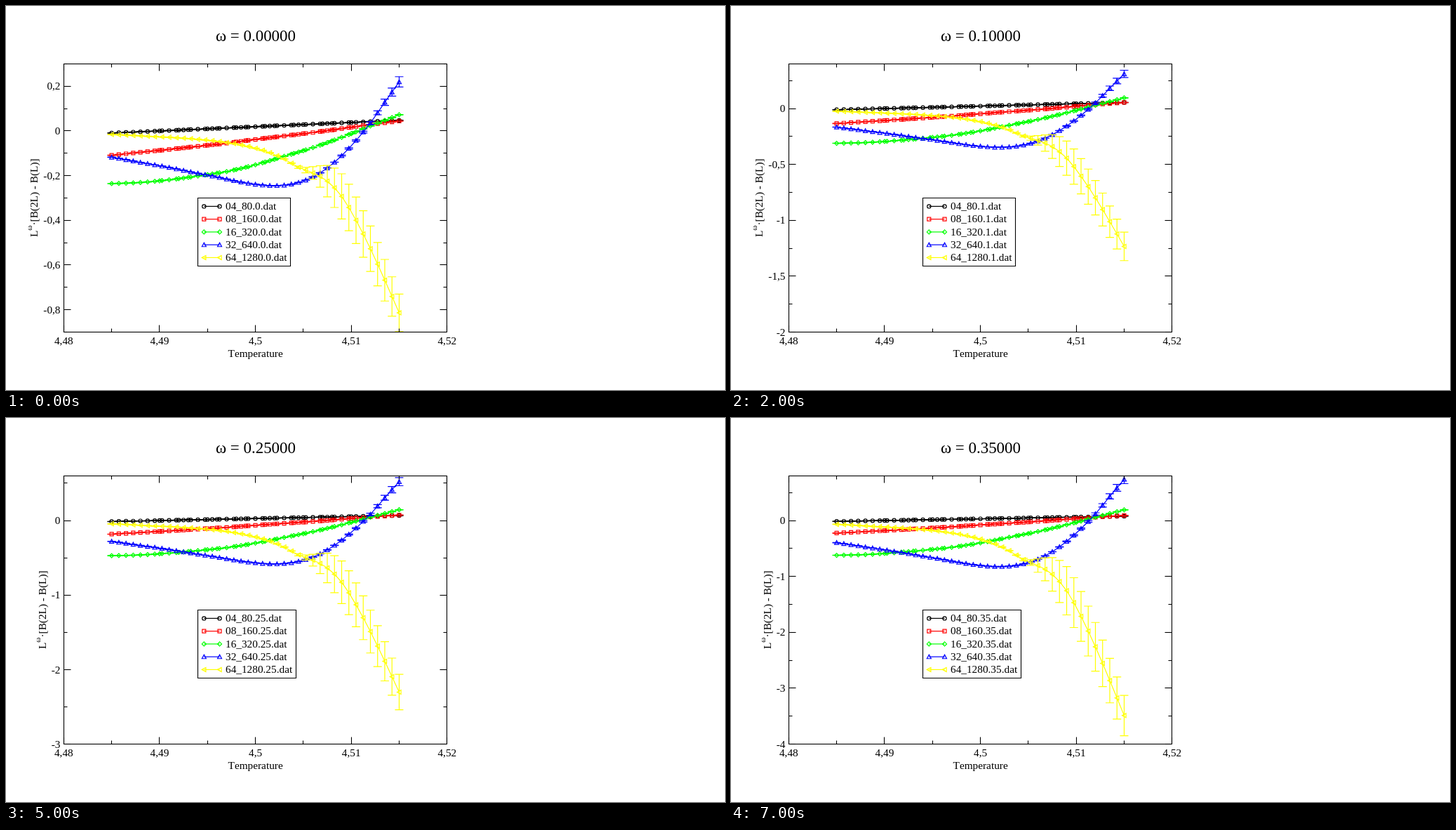
These frames come from a looping animation (1025 px wide and 547 px high, 8 s). An HTML page with a canvas:

```html
<!DOCTYPE html>
<html>
<head>
<meta charset="utf-8">
<style>
html, body { margin: 0; width: 100%; height: 100%; overflow: hidden; background: #fff; }
canvas { display: block; }
</style>
</head>
<body>
<canvas id="stage" width="1025" height="547"></canvas>
<script>
const ctx = document.getElementById('stage').getContext('2d');
const FACE = '"Liberation Serif", "Times New Roman", serif';
const SIZE = 15.3;
const BOX = { l: 82.3, r: 628.8, t: 82.3, b: 464.5 };
const STEP = 1000;

// Axis bottom, axis top and major tick spacing for each exponent
const VIEWS = [
  [-0.9, 0.3, 0.2], [-2, 0.3, 0.5], [-2, 0.4, 0.5], [-2, 0.4, 0.5],
  [-2, 0.5, 0.5], [-3, 0.6, 1], [-3, 0.7, 1], [-4, 0.8, 1]
];

// Temperatures in thousandths above 4.485
const coarse = Array.from({ length: 41 }, (_, i) => i * 0.75);
const dense = [...new Set([...coarse, ...Array.from({ length: 21 }, (_, i) => i + 5)])]
  .sort((a, b) => a - b);

// Values and error sizes are in thousandths, evenly spaced knots
const SETS = [
  { L: 4, name: '04_80', color: '#000', mark: 'circle', ts: dense, ys: [-9.8, 18.6, 47] },
  { L: 8, name: '08_160', color: '#f00', mark: 'square', ts: dense,
    ys: [-109, -96, -83, -69, -55, -38.5, -23, -7.5, 10, 28, 43.5] },
  { L: 16, name: '16_320', color: '#0f0', mark: 'diamond', ts: dense,
    ys: [-236, -231, -219, -202, -182, -152, -114, -75, -29, 22, 72] },
  { L: 32, name: '32_640', color: '#00f', mark: 'up', ts: coarse,
    ys: [-118, -129, -141, -152, -164, -177, -190, -202, -216, -229, -239,
      -245, -243, -231, -206, -166, -111, -43, 35, 128, 219],
    errs: [2.5, 3, 3, 4, 6, 9, 14, 18, 23] },
  { L: 64, name: '64_1280', color: '#ff0', mark: 'left', ts: coarse,
    ys: [-16, -19, -22.5, -26, -29, -33, -38, -44, -52, -63, -78,
      -98, -126, -163, -188, -225, -293, -400, -527, -668, -814],
    errs: [5, 12, 28, 48, 70, 88, 101, 104, 104, 104, 101.5, 97, 93, 88, 84] }
];

function spline(k, u) {
  const n = k.length - 1;
  const i = Math.min(n - 1, Math.floor(u * n));
  const f = u * n - i;
  const b = k[i], c = k[i + 1];
  const a = i ? k[i - 1] : 2 * b - c;
  const d = i < n - 1 ? k[i + 2] : 2 * c - b;
  return b + f * (c - a + f * (2 * a - 5 * b + 4 * c - d + f * (3 * (b - c) + d - a))) / 2;
}

function errorAt(set, i) {
  const first = 41 - (set.errs ? set.errs.length : 0);
  return set.errs && i >= first ? set.errs[i - first] : 0.8;
}

const crisp = v => Math.floor(v) + 0.5;
const xOf = T => BOX.l + (T - 4.48) / 0.04 * (BOX.r - BOX.l);
const comma = v => String(+v.toFixed(2)).replace('.', ',');

function line(x1, y1, x2, y2) {
  ctx.beginPath();
  ctx.moveTo(x1, y1);
  ctx.lineTo(x2, y2);
  ctx.stroke();
}

function text(s, x, y, align = 'left', size = SIZE) {
  ctx.font = `${size}px ${FACE}`;
  ctx.fontKerning = 'none';
  ctx.textAlign = align;
  ctx.fillStyle = '#000';
  ctx.fillText(s, x, y);
  return ctx.measureText(s).width;
}

const SHAPES = {
  square: [[-2.5, -2.5], [2.5, -2.5], [2.5, 2.5], [-2.5, 2.5]],
  diamond: [[0, -3], [3, 0], [0, 3], [-3, 0]],
  up: [[0, -3], [3, 2.6], [-3, 2.6]],
  left: [[-3, 0], [2.6, -3], [2.6, 3]]
};

function marker(kind, x, y) {
  ctx.beginPath();
  if (kind === 'circle') ctx.arc(x, y, 2.6, 0, 2 * Math.PI);
  else SHAPES[kind].forEach(([dx, dy]) => ctx.lineTo(x + dx, y + dy));
  ctx.closePath();
  ctx.stroke();
}

function drawSet(set, w, yOf) {
  const scale = Math.pow(set.L, w) / 1000;
  const pts = set.ts.map((t, i) => ({
    x: xOf(4.485 + t / 1000),
    v: spline(set.ys, t / 30) * scale,
    e: errorAt(set, i) * scale
  }));
  ctx.strokeStyle = set.color;
  ctx.lineWidth = 1.2;
  ctx.beginPath();
  pts.forEach(p => ctx.lineTo(p.x, yOf(p.v)));
  ctx.stroke();
  for (const { x, v, e } of pts) {
    const top = yOf(v + e), bottom = yOf(v - e);
    line(x, top, x, bottom);
    line(x - 6, top, x + 6, top);
    line(x - 6, bottom, x + 6, bottom);
    marker(set.mark, x, yOf(v));
  }
}

function drawAxes([lo, hi, major], yOf) {
  ctx.strokeStyle = '#000';
  ctx.lineWidth = 1.1;
  const l = crisp(BOX.l), r = crisp(BOX.r), t = crisp(BOX.t), b = crisp(BOX.b);
  ctx.strokeRect(l, t, r - l, b - t);

  for (let i = 0; i <= 8; i++) {
    const T = 4.48 + i * 0.005, x = crisp(xOf(T)), len = i % 2 ? 5 : 10;
    line(x, t, x, t + len);
    line(x, b, x, b - len);
    if (i % 2 === 0) text(comma(T), xOf(T), 482, 'center');
  }

  let widest = 0;
  const half = major / 2;
  for (let i = Math.ceil(lo / half - 1e-6); i * half <= hi + 1e-6; i++) {
    const v = i * half, y = crisp(yOf(v)), len = i % 2 ? 5 : 10;
    line(l, y, l + len, y);
    line(r, y, r - len, y);
    if (i % 2 === 0) widest = Math.max(widest, text(comma(v), 77.5, yOf(v) + 5.2, 'right'));
  }

  text('Temperature', 355.6, 499.6, 'center');
  ctx.save();
  ctx.translate(69.5 - widest, 329);
  ctx.rotate(-Math.PI / 2);
  let x = text('L', 0, 0);
  x += text('ω', x, -8, 'left', SIZE * 0.707);
  text('·[B(2L) - B(L)]', x, 0);
  ctx.restore();
}

function drawLegend(w) {
  const tail = (w ? String(w) : '0.0').slice(1) + '.dat';
  ctx.font = `${SIZE}px ${FACE}`;
  const right = 313 + ctx.measureText(SETS[4].name + tail).width + 5;
  ctx.lineWidth = 1.1;
  ctx.strokeStyle = '#000';
  ctx.fillStyle = '#fff';
  ctx.beginPath();
  ctx.rect(273.5, 273.5, crisp(right) - 273.5, 97);
  ctx.fill();
  ctx.stroke();
  SETS.forEach((set, i) => {
    const y = 285.4 + i * 18.25;
    ctx.strokeStyle = set.color;
    ctx.lineWidth = 1.2;
    line(282.3, y, 304.5, y);
    marker(set.mark, 282.3, y);
    marker(set.mark, 304.5, y);
    text(set.name + tail, 313, y + 4.8);
  });
}

function draw(k) {
  let w = 0;
  for (let i = 0; i < k; i++) w += 0.05;
  const view = VIEWS[k], [lo, hi] = view;
  const yOf = v => BOX.t + (hi - v) / (hi - lo) * (BOX.b - BOX.t);

  ctx.fillStyle = '#fff';
  ctx.fillRect(0, 0, 1025, 547);
  text('ω = ' + w.toFixed(5), 356, 49.6, 'center', SIZE * 1.5);
  ctx.save();
  ctx.beginPath();
  ctx.rect(BOX.l, BOX.t, BOX.r - BOX.l, BOX.b - BOX.t);
  ctx.clip();
  SETS.forEach(set => drawSet(set, w, yOf));
  ctx.restore();
  drawAxes(view, yOf);
  drawLegend(w);
}

let shown = -1;
const start = performance.now();
function tick() {
  const k = Math.floor((performance.now() - start) / STEP) % VIEWS.length;
  if (k !== shown) draw(shown = k);
  requestAnimationFrame(tick);
}
tick();
</script>
</body>
</html>
```
